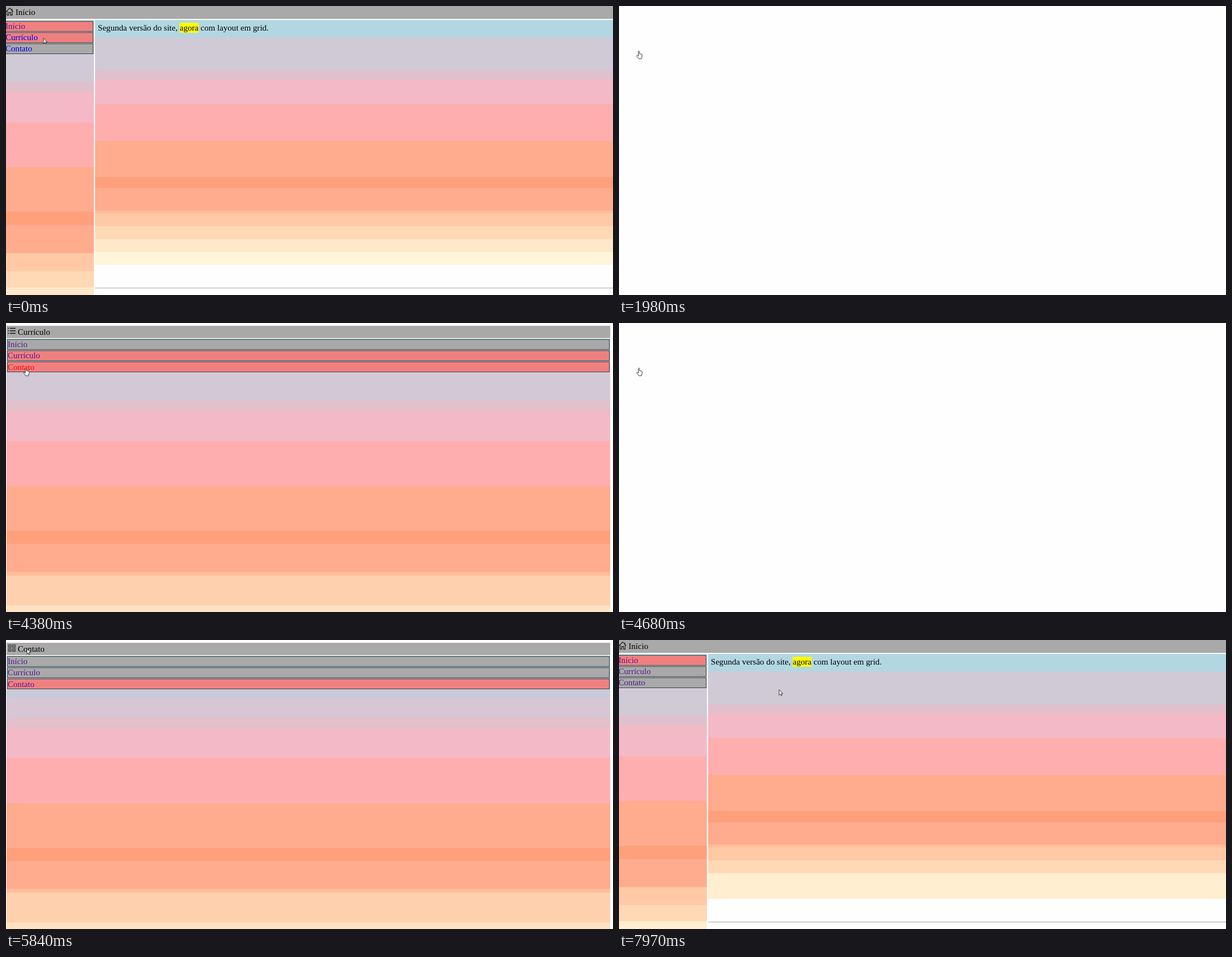
An HTML page for the animation above (8 s loop, 1084 by 517 pixels).

```html
<!DOCTYPE html>
<html lang="pt">
<head>
<meta charset="utf-8">
<title>Layout em grid</title>
<style>
html, body { margin: 0; width: 100%; height: 100%; overflow: hidden; background: #fefefe; }
svg { display: block; width: 1084px; height: 517px; }
text { font: 15.1px "Liberation Serif", "Times New Roman", serif; }
rect { shape-rendering: crispEdges; }
</style>
</head>
<body>
<svg id="stage" viewBox="0 0 1084 517"></svg>
<script>
const LOOP = 8000;
const GRAY = '#a9a9a9', CORAL = '#f08080', SKY = '#b2d7e3';
const BLUE = '#0000ee', PURPLE = '#551a8b', RED = '#ff0000';
const LABELS = ['Início', 'Currículo', 'Contato'];

const rect = (x, y, w, h, fill) =>
  `<rect x="${x}" y="${y}" width="${w}" height="${h}" fill="${fill}"/>`;
const text = (x, y, s, fill = '#000') => `<text x="${x}" y="${y}" fill="${fill}">${s}</text>`;

// Stacked bands: [top, colour] pairs, each reaching down to the next one.
const bands = (x, w, list, end) => list.map(([y, fill], i) =>
  rect(x, y, w, (i + 1 < list.length ? list[i + 1][0] : end) - y, fill)).join('');

const icons = {
  home: '<path d="M.2 10.2 6.5 3.6 12.8 10.2M2 8.6V16.4H4.8V11.6H8.2V16.4H11V8.6M10.6 7.6V4.6" fill="none" stroke="#111" stroke-width="1.1"/>',
  list: [9.5, 14, 18.5].map(y =>
    `<path d="M3.3 ${y}h2M7 ${y}h10" stroke="#111" stroke-width="1.5"/>`).join(''),
  grid: [[4, 8], [11.3, 8], [4, 15], [11.3, 15]].map(([x, y]) =>
    `<path d="M${x + .5} ${y + .5}h4.6v4.6h-4.6zM${x + 2} ${y + 2.8}h1.6" fill="none" stroke="#333" stroke-width="1.2"/>`).join('')
};

const cursors = {
  arrow: 'M.4.4V10L2.6 8.1 4.1 11.2 5.6 10.5 4.2 7.5H7Z',
  hand: 'M3.5 9V1.6Q3.5.5 4.5.5 5.5.5 5.5 1.6V5.3L9 6.2Q10.5 6.6 10.4 8.2L10 11 9 14.4H4.6L.8 9.8Q.3 8.5 1.4 8.2 2.2 8.1 3.5 9.6Z'
};
const cursor = ([kind, x, y]) =>
  `<path transform="translate(${x} ${y})" d="${cursors[kind]}" fill="#fff" stroke="#222" stroke-width=".9" stroke-linejoin="round"/>`;

function menu(s, x, w, tops, textX, baselines) {
  return LABELS.map((label, i) => {
    const h = 19;
    return rect(x, tops[i], w, h, '#3a3f44') +
      rect(x + 1, tops[i] + 1, w - 2, h - 2, s.hot[i] ? CORAL : GRAY) +
      text(textX, baselines[i], label, s.ink[i]);
  }).join('');
}

function homePage(s) {
  const low = s.merged ? ['#ffeecf', '#ffeecf'] : ['#ffe7c9', '#fff5d8'];
  const side = [[25, SKY], [56, '#cfcad6'], [135, '#e0c0cc'], [154, '#f4b9c6'], [208, '#ffaeb0'],
    [288, '#ffab8e'], [368, '#ffa07c'], [392, '#ffab8e'], [442, '#ffc9a6'], [474, '#ffd8b5'], [503, low[0]]];
  const main = [[25, SKY], [56, '#cfcad6'], [115, '#e0c0cc'], [131, '#f4b9c6'], [175, '#ffaeb0'],
    [241, '#ffab8e'], [306, '#ffa07c'], [326, '#ffab8e'], [366, '#ffbd9b'], [371, '#ffc9a6'],
    [394, '#ffd8b5'], [417, low[0]], [440, low[1]]];
  return rect(0, 0, 1084, 23, GRAY) + icons.home + text(17, 16, LABELS[0]) +
    bands(0, 157, side, 517) + bands(159, 925, main, 463) +
    menu(s, -3, 159, [27, 47, 67], -1, [41, 61, 81]) +
    rect(310, 30, 34, 18, '#ffff00') +
    text(164, 44, 'Segunda versão do site, agora com layout em grid.') +
    rect(159, 504, 925, 1, '#a8a8a8');
}

function innerPage(s, icon, title, top) {
  const list = [[28, SKY], ...top, [139, '#e2c0cc'], [157, '#f4b9c6'], [211, '#ffaeb0'],
    [292, '#ffab8e'], [372, '#ffa07c'], [395, '#ffab8e'], [445, '#ffbd9b'], [452, '#ffd0ad'], [505, '#ffe2c2']];
  return rect(1, 5, 1078, 22, GRAY) + icons[icon] + text(21, 21, title) +
    bands(1, 1078, list, 517) +
    menu(s, 2, 1076, [29, 49, 69], 3, [43, 63, 84]);
}

const pages = {
  blank: () => '',
  home: homePage,
  resume: s => innerPage(s, 'list', LABELS[1], [[88, '#d3c8d5']]),
  contact: s => innerPage(s, 'grid', LABELS[2], [[88, '#c7cad8'], [104, '#d7c6d4']])
};

// Each step changes part of the state and holds until the next.
const steps = [
  [0, { page: 'home', merged: false, hot: [1, 1, 0], ink: [PURPLE, BLUE, BLUE], at: ['arrow', 66.5, 57] }],
  [330, { at: ['hand', 46.5, 56] }],
  [510, { at: ['hand', 37, 60] }],
  [1680, { ink: [PURPLE, RED, BLUE] }],
  [1830, { ink: [PURPLE, BLUE, BLUE], at: ['hand', 33, 70] }],
  [1980, { page: 'blank', at: ['hand', 31, 80] }],
  [2130, { page: 'resume', hot: [0, 1, 1], ink: [PURPLE, PURPLE, BLUE] }],
  [4380, { ink: [PURPLE, PURPLE, RED] }],
  [4530, { ink: [PURPLE, PURPLE, BLUE] }],
  [4680, { page: 'blank' }],
  [4810, { page: 'contact', hot: [0, 0, 1], ink: [PURPLE, PURPLE, PURPLE] }],
  [5270, { at: ['hand', 30, 72] }],
  [5400, { at: ['hand', 36, 56] }],
  [5540, { at: ['arrow', 42, 44] }],
  [5690, { hot: [1, 0, 1], at: ['arrow', 40, 31] }],
  [5840, { hot: [0, 0, 1], at: ['arrow', 37, 15] }],
  [5990, { at: ['arrow', 37, 12] }],
  [6290, { hot: [1, 0, 1], at: ['arrow', 36, 29] }],
  [6420, { at: ['hand', 31, 33] }],
  [6680, { ink: [RED, PURPLE, PURPLE] }],
  [6950, { ink: [PURPLE, PURPLE, PURPLE], at: ['arrow', 34, 34] }],
  [7100, { page: 'home', merged: true, hot: [1, 0, 0] }],
  [7390, { at: ['arrow', 36, 45.5] }],
  [7540, { hot: [1, 1, 0], at: ['arrow', 60, 62.5] }],
  [7690, { hot: [1, 0, 1], at: ['arrow', 158, 82.5] }],
  [7840, { hot: [1, 0, 0], at: ['arrow', 233, 88] }],
  [7970, { at: ['arrow', 285.5, 88.5] }]
];

const stage = document.getElementById('stage');
let shown = -1;

function draw(ms) {
  const t = ms % LOOP;
  const past = steps.filter(([start]) => start <= t);
  if (past.length === shown) return;
  shown = past.length;
  const s = Object.assign({}, ...past.map(([, change]) => change));
  stage.innerHTML = rect(0, 0, 1084, 517, '#fefefe') + pages[s.page](s) + cursor(s.at);
}

const begin = performance.now();
function tick() {
  draw(performance.now() - begin);
  requestAnimationFrame(tick);
}
tick();
</script>
</body>
</html>
```
